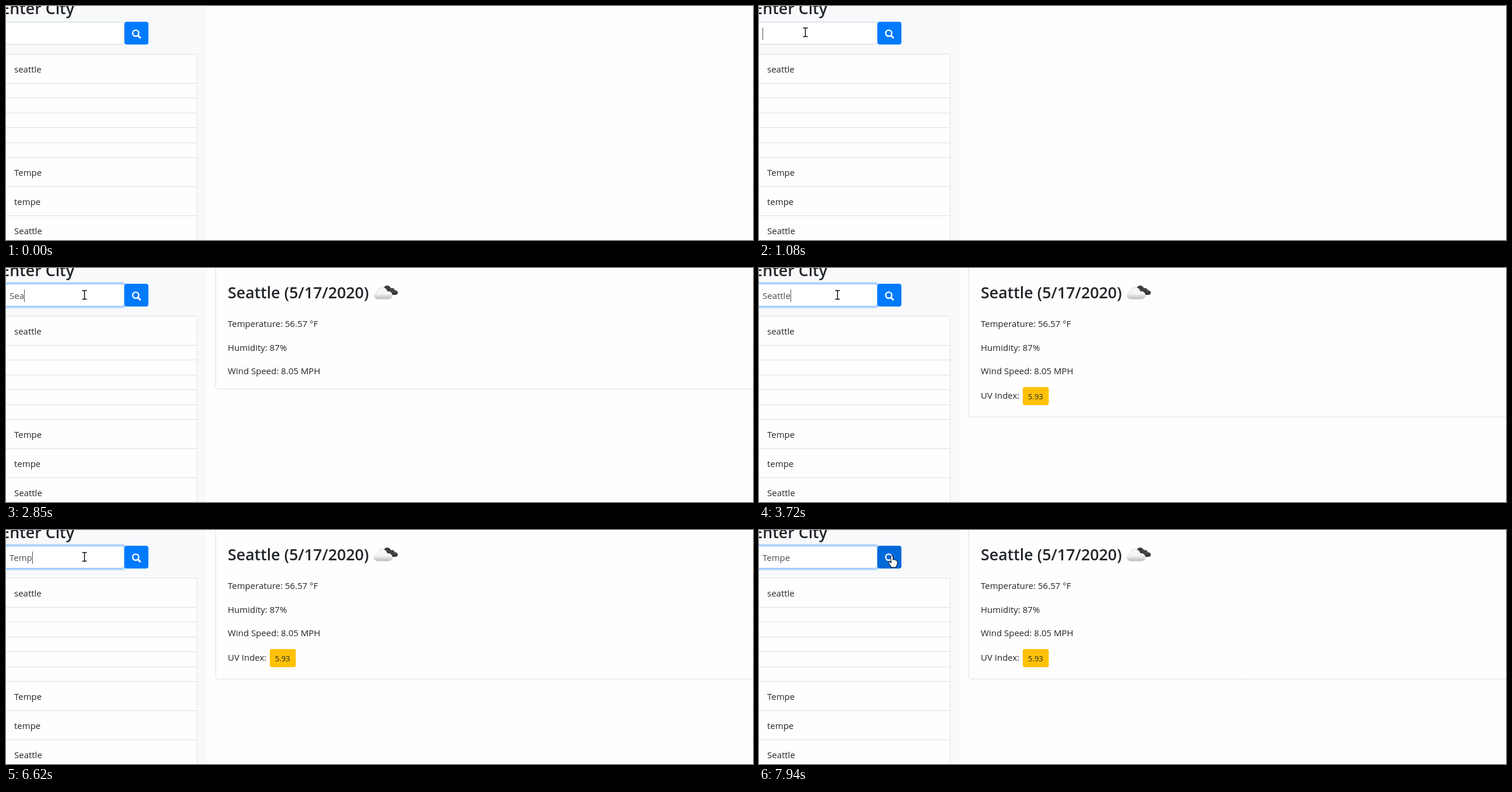
Animation, 1280 px wide and 401 px high, one loop 8 s. Source, as an HTML page with a canvas:

```html
<!DOCTYPE html>
<html lang="en">
<head>
<meta charset="utf-8">
<title>City weather</title>
<style>
html, body { margin: 0; width: 100%; height: 100%; overflow: hidden; background: #fefefe; }
canvas { display: block; }
</style>
</head>
<body>
<canvas id="stage" width="1280" height="401"></canvas>
<script>
const ctx = document.getElementById('stage').getContext('2d');
const LOOP = 8000;
const FACE = '"Open Sans", "Noto Sans", sans-serif';
const BODY = `15px ${FACE}`;
const HEAD = `600 26.8px ${FACE}`;
const INK = '#212529';
const LINE = '#dcdfe0';

// [time, text in the field, caret visible]
const typing = [
  [0, '', 0], [1050, '', 1], [1540, '', 0], [2050, '', 1], [2480, 'S', 1], [2770, 'Se', 1],
  [2850, 'Sea', 1], [3210, 'Seat', 1], [3370, 'Seatt', 1], [3540, 'Seattl', 1], [3720, 'Seattle', 1],
  [4130, 'Seattl', 1], [4240, 'Seatt', 1], [4450, 'Seat', 1], [4600, 'Sea', 1], [4730, 'Se', 1],
  [4860, 'S', 1], [5290, 'S', 0], [5520, '', 0], [5810, '', 1], [5880, 'T', 1], [6160, 'Te', 1],
  [6440, 'Tem', 1], [6620, 'Temp', 1], [7050, 'Tempe', 1], [7550, 'Tempe', 0]
];

// [start, end, x0, y0, x1, y1]
const moves = [
  [450, 960, 5, 10, 79.5, 45],
  [1280, 1500, 79.5, 45, 134.5, 46],
  [7420, 7940, 134.5, 46, 228, 45]
];

const clamp = v => Math.max(0, Math.min(1, v));
const ease = v => v * v * (3 - 2 * v);
const latest = (list, t) => list.filter(k => k[0] <= t).pop();

function text(str, x, y, font = BODY, color = INK, align = 'left') {
  ctx.font = font;
  ctx.fillStyle = color;
  ctx.textAlign = align;
  ctx.fillText(str, x, y);
}

function box(x, y, w, h, r, fill, stroke) {
  ctx.beginPath();
  ctx.roundRect(x, y, w, h, r);
  if (fill) { ctx.fillStyle = fill; ctx.fill(); }
  if (stroke) { ctx.lineWidth = 1; ctx.strokeStyle = stroke; ctx.stroke(); }
}

function rule(y) {
  ctx.fillStyle = LINE;
  ctx.fillRect(0, y, 327, 1);
}

function drawField(t) {
  const [, str, caret] = latest(typing, t);
  const f = ease(clamp((t - 1050) / 150));
  const mix = (a, b) => Math.round(a + (b - a) * f);
  if (f > 0) box(-20, 27 - 3 * f, 223 + 3 * f, 39 + 6 * f, 6, `rgba(0,123,255,${0.25 * f})`);
  box(-20, 27.5, 222.5, 38, 4, '#fff', `rgb(${mix(206, 128)},${mix(212, 189)},${mix(218, 255)})`);
  text(str, 6, 53, BODY, '#495057');
  if (caret) {
    ctx.fillStyle = '#495057';
    ctx.fillRect(Math.round(6 + ctx.measureText(str).width), 37, 1, 21);
  }
}

function drawButton(hover) {
  box(203, 27, 41, 39, 4, hover ? '#0069d9' : '#007bff');
  ctx.strokeStyle = '#fff';
  ctx.lineCap = 'round';
  ctx.lineWidth = 2.4;
  ctx.beginPath();
  ctx.arc(222.3, 46.6, 5.2, 0, 7);
  ctx.stroke();
  ctx.lineWidth = 3;
  ctx.beginPath();
  ctx.moveTo(226.4, 50.8);
  ctx.lineTo(229.8, 54.2);
  ctx.stroke();
}

function drawSide(t, hover) {
  ctx.fillStyle = '#f8f9fa';
  ctx.fillRect(0, 0, 343, 401);
  text('Enter City', 117, 14, HEAD, INK, 'right');
  drawField(t);
  drawButton(hover);

  box(-20, 82.5, 347.5, 340, 4, '#fefefe', LINE);
  for (let i = 0; i < 6; i++) rule(Math.round(132 + i * 25.4));
  rule(309);
  rule(359);
  text('seattle', 14, 114);
  text('Tempe', 14, 291);
  text('tempe', 14, 341);
  text('Seattle', 14, 391);
}

function cloud(x, y, s, top, bottom) {
  const g = ctx.createLinearGradient(0, y - 12 * s, 0, y + 10 * s);
  g.addColorStop(0, top);
  g.addColorStop(0.55, top);
  g.addColorStop(1, bottom);
  ctx.fillStyle = g;
  ctx.beginPath();
  ctx.ellipse(x - 9 * s, y + 4 * s, 7 * s, 6 * s, 0, 0, 7);
  ctx.ellipse(x - 1 * s, y - 2 * s, 9 * s, 9 * s, 0, 0, 7);
  ctx.ellipse(x + 9 * s, y + 3 * s, 8 * s, 7 * s, 0, 0, 7);
  ctx.rect(x - 9 * s, y + 2 * s, 18 * s, 8 * s);
  ctx.fill();
}

function drawIcon() {
  cloud(654, 38, 0.72, '#3e3e40', '#58585a');
  cloud(662, 40.5, 0.56, '#454547', '#2f2f31');
  ctx.save();
  ctx.shadowColor = 'rgba(0,0,0,.35)';
  ctx.shadowBlur = 2;
  cloud(646, 43.5, 0.95, '#f6f6f6', '#bdbdbd');
  ctx.restore();
}

function drawCard(uv) {
  box(359.5, -20, 960, uv ? 275.5 : 227.5, 4, '#fefefe', LINE);
  text('Seattle (5/17/2020)', 380, 51.5, HEAD);
  drawIcon();
  text('Temperature: 56.57 °F', 380, 101);
  text('Humidity: 87%', 380, 142);
  text('Wind Speed: 8.05 MPH', 380, 182);
  if (!uv) return;
  text('UV Index:', 380, 224);
  box(452, 204, 44.5, 31, 3, '#ffc107');
  text('5.93', 461, 224.5, `13px ${FACE}`);
}

function outline(path, x, y) {
  ctx.save();
  ctx.translate(x, y);
  ctx.lineWidth = 1;
  ctx.lineJoin = 'round';
  ctx.fillStyle = '#fff';
  ctx.strokeStyle = '#000';
  const p = new Path2D(path);
  ctx.fill(p);
  ctx.stroke(p);
  ctx.restore();
}

const drawArrow = (x, y) => outline('M0 0V16L4 12.5 6.5 18 9 17 6.5 11.5H11.5Z', x, y);

const drawHand = (x, y) => outline(
  'M-2 0Q0-2 1.5 0V6Q3 4.5 4.5 6.5Q6 5.5 7 7.3Q9 6.5 9 9V13Q9 15 7 17V19H-2V17L-6 11Q-6.5 8.5-4 9.5L-2 11.5Z',
  x, y);

function drawBeam(x, y) {
  const p = new Path2D('M-4-7.5H-1.5Q0-7.5 0-6Q0-7.5 1.5-7.5H4M0-6V6M-4 7.5H-1.5Q0 7.5 0 6Q0 7.5 1.5 7.5H4');
  ctx.save();
  ctx.translate(Math.round(x - 0.5) + 0.5, Math.round(y));
  ctx.lineCap = 'butt';
  ctx.strokeStyle = '#000';
  ctx.lineWidth = 1.4;
  ctx.stroke(p);
  ctx.restore();
}

function pointer(t) {
  const m = latest(moves, t);
  if (!m) return null;
  const [a, b, x0, y0, x1, y1] = m;
  // the pointer is sampled about twenty times a second
  const step = 52;
  const n = Math.ceil((b - a) / step);
  const k = ease(clamp((Math.floor((t - a) / step) + 1) / n));
  return { x: x0 + (x1 - x0) * k, y: y0 + (y1 - y0) * k };
}

function drawPointer(t, p, hover) {
  if (t >= 30 && t < 160) {
    const k = Math.min(2, Math.floor((t - 30) / 43));
    drawArrow(974 - 389 * k, 370 - 117 * k);
  }
  if (!p) return;
  if (hover) drawHand(p.x, p.y);
  else drawBeam(p.x, p.y);
}

function draw(t) {
  const p = pointer(t);
  const hover = p && p.x >= 203;
  ctx.fillStyle = '#fefefe';
  ctx.fillRect(0, 0, 1280, 401);
  drawSide(t, hover);
  if (t >= 2190) drawCard(t >= 2900);
  drawPointer(t, p, hover);
}

const start = performance.now();
function tick() {
  draw((performance.now() - start) % LOOP);
  requestAnimationFrame(tick);
}
tick();
</script>
</body>
</html>
```
